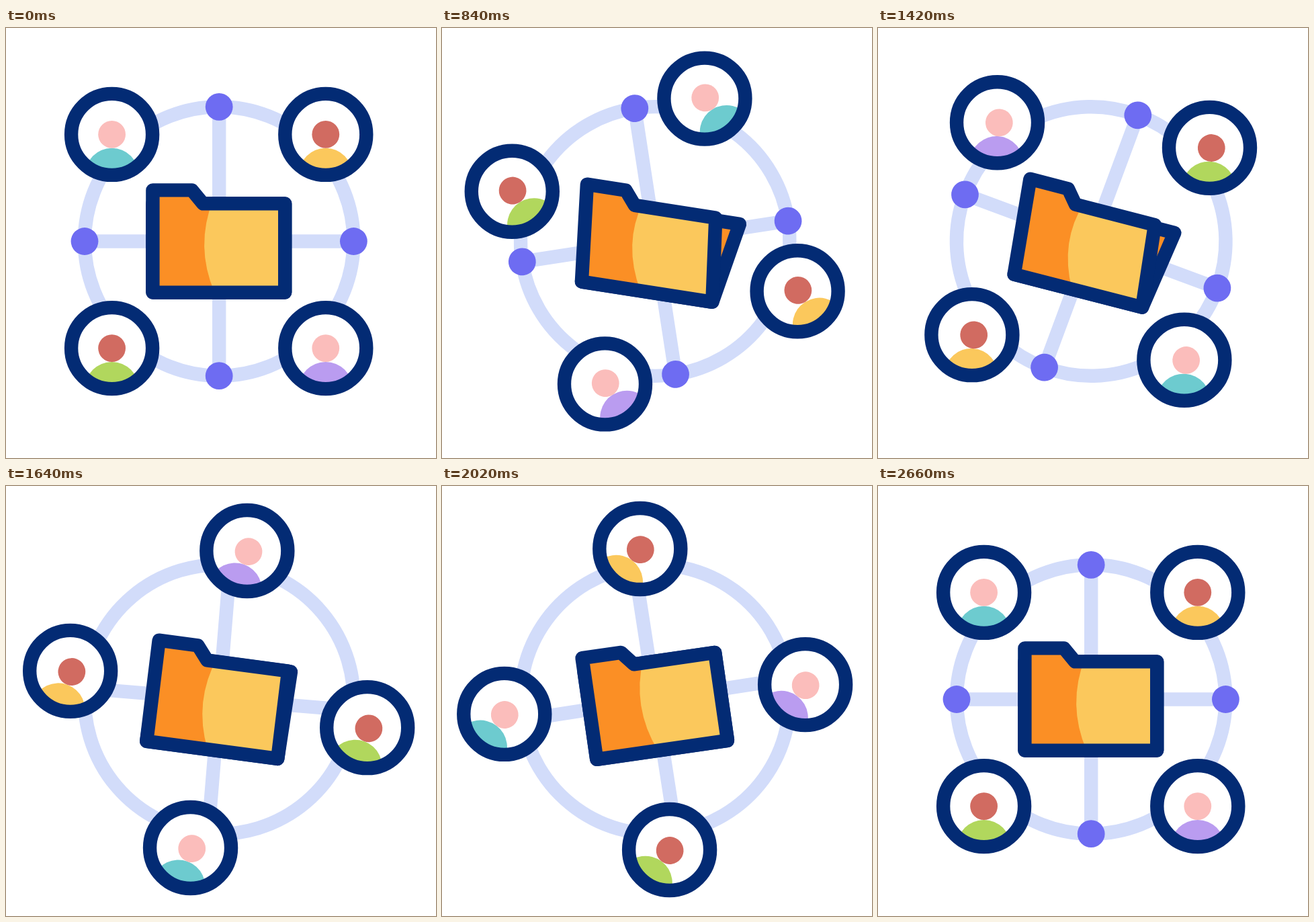
An HTML page with a canvas for the animation above (3 s loop, 640x640 px).

```html
<!DOCTYPE html>
<html lang="en">
<head>
<meta charset="utf-8">
<title>Shared folder network</title>
<style>
  html, body { margin: 0; width: 100%; height: 100%; overflow: hidden; background: #fff; }
  canvas { display: block; }
</style>
</head>
<body>
<canvas id="stage" width="640" height="640"></canvas>
<script>
const ctx = document.getElementById("stage").getContext("2d");
const LOOP = 3000, LINE = 20.4, RAD = Math.PI / 180;
const NAVY = "#032b74", PALE = "#d2dcfa", DOT = "#6e6cf2";
const ORANGE = "#fb8f25", YELLOW = "#fbc85c", PINK = "#fbbdbb", RED = "#d16b61";

// Keys are [time in ms, value]
const tracks = {
  orbit: [[199, 0], [2583, 360]],
  cross: [[199, 0], [764, -11], [1267, 25], [1932, -9.2], [2650, 0]],
  sway: [[199, 0], [576, -35], [663, -35], [2119, 38], [2650, 0]],
  tilt: [[199, 0], [1346, 15], [2175, -10.5], [2650, 0]],
  lean: [[199, 0], [1023, 1], [1271, 1], [1728, 0]],
  drop: [[199, 0], [1271, 1], [1710, 0]]
};

// Angle on the orbit, head colour, body colour
const people = [
  [-135, PINK, "#6dcbcf"],
  [-45, RED, YELLOW],
  [45, PINK, "#ba9cf0"],
  [135, RED, "#b1d75d"]
];

function valueAt(keys, t) {
  if (t <= keys[0][0]) return keys[0][1];
  for (let i = 1; i < keys.length; i++) {
    const [t0, a] = keys[i - 1], [t1, b] = keys[i];
    if (t < t1) {
      const u = (t - t0) / (t1 - t0);
      return a + (b - a) * u * u * (3 - 2 * u);
    }
  }
  return keys[keys.length - 1][1];
}

function circle(x, y, r) {
  ctx.beginPath();
  ctx.arc(x, y, r, 0, 2 * Math.PI);
}

function disc(x, y, r, color) {
  circle(x, y, r);
  ctx.fillStyle = color;
  ctx.fill();
}

function outline(color) {
  ctx.strokeStyle = color;
  ctx.stroke();
}

function polygon(points) {
  ctx.beginPath();
  points.forEach(([x, y]) => ctx.lineTo(x, y));
  ctx.closePath();
}

function scoped(x, y, angle, draw) {
  ctx.save();
  ctx.translate(x, y);
  ctx.rotate(angle * RAD);
  draw();
  ctx.restore();
}

function drawNetwork() {
  circle(0, 0, 200.3);
  ctx.moveTo(-200, 0);
  ctx.lineTo(200, 0);
  ctx.moveTo(0, -200);
  ctx.lineTo(0, 200);
  outline(PALE);
  for (const [x, y] of [[0, -1], [1, 0], [0, 1], [-1, 0]]) disc(200.2 * x, 200.2 * y, 20.4, DOT);
}

function drawPerson([start, head, body], orbit, sway) {
  const a = (start + orbit) * RAD, o = orbit * RAD;
  ctx.save();
  ctx.translate(316.7 + 225 * Math.cos(a), 317.5 + 225 * Math.sin(a));
  disc(0, 0, 60.5, "#fff");
  ctx.save();
  circle(0, 0, 55);
  ctx.clip();
  // The figures turn about a point slightly right of the rings' centre
  scoped(1.4 * (1 - Math.cos(o)), -1.4 * Math.sin(o), sway, () => {
    disc(0, 60.3, 40, body);
    disc(0, 0, 20.4, head);
  });
  ctx.restore();
  circle(0, 0, 60.5);
  outline(NAVY);
  ctx.restore();
}

function drawFolder(lean, drop) {
  const bx = 25.5 * lean, by = 17.6 * drop;
  polygon([[-98.4, 76.1], [-98.4 + bx, -56.1 + by], [98.4 + bx, -56.1 + by], [98.4, 76.1]]);
  ctx.fillStyle = ORANGE;
  ctx.fill();
  outline(NAVY);

  const fx = -16.4 * lean, fy = 12 * drop;
  const top = [[-98.4, -76.1], [-40, -76.1], [-23.5, -56.1], [98.4, -56.1]];
  const front = [[-98.4, 76.1], ...top.map(([x, y]) => [x + fx, y + fy]), [98.4, 76.1]];
  polygon(front);
  ctx.fillStyle = ORANGE;
  ctx.fill();

  const shift = -4 * lean;
  ctx.beginPath();
  ctx.moveTo(-8.5 + fx + shift, -62 + fy);
  ctx.quadraticCurveTo(-35.8 + fx / 2 + shift, 7 + fy / 2, -6.5 + shift, 76.1);
  ctx.lineTo(98.4, 76.1);
  ctx.lineTo(98.4 + fx, -56.1 + fy);
  ctx.fillStyle = YELLOW;
  ctx.fill();

  polygon(front);
  outline(NAVY);
}

function draw(now) {
  const t = now % LOOP;
  const pose = {};
  for (const name in tracks) pose[name] = valueAt(tracks[name], t);

  ctx.fillStyle = "#fff";
  ctx.fillRect(0, 0, 640, 640);
  ctx.lineWidth = LINE;
  ctx.lineJoin = "round";
  scoped(317.2, 317.5, pose.cross, drawNetwork);
  people.forEach(person => drawPerson(person, pose.orbit, pose.sway));
  scoped(316.8, 317.5, pose.tilt, () => drawFolder(pose.lean, pose.drop));
  requestAnimationFrame(draw);
}
requestAnimationFrame(draw);
</script>
</body>
</html>
```
